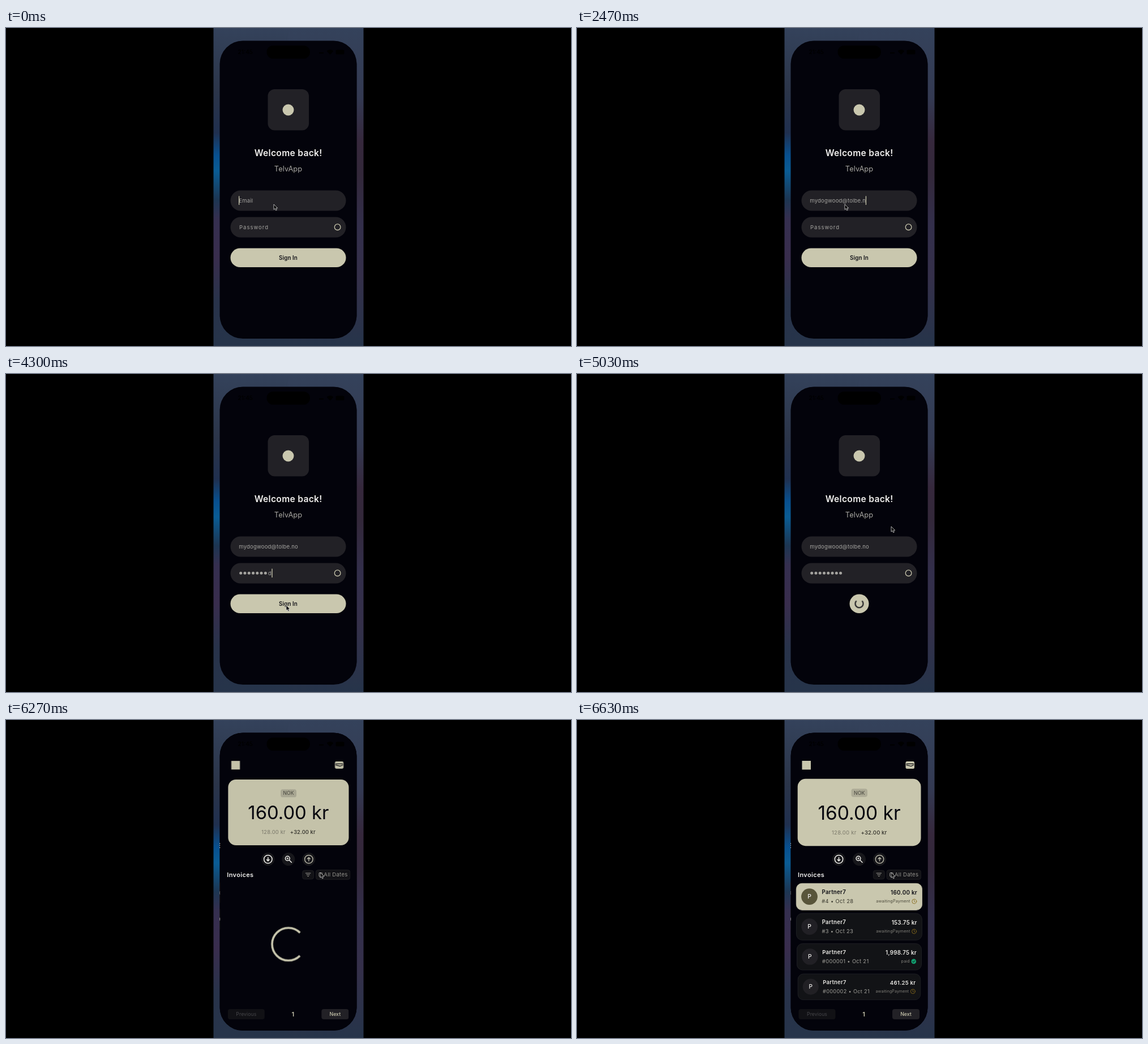
An HTML page that plays this animation: 998 px wide and 561 px high, repeating every 6.67 s.

```html
<!DOCTYPE html>
<html lang="en">
<head>
<meta charset="utf-8">
<title>Sign in</title>
<style>
  :root { --bg: #03030b; --tile: #222126; --sand: #c9c7ae; --loop: 6670ms; }
  html, body { margin: 0; width: 100%; height: 100%; overflow: hidden; background: #000; }
  svg { display: block; }
  text { font-family: Inter, Roboto, sans-serif; white-space: pre; }
  .mid { text-anchor: middle; }
  .end { text-anchor: end; }
  .semi { font-weight: 600; }
  .sand { fill: var(--sand); }
  .tile { fill: var(--tile); }
  .line { fill: none; stroke-linecap: round; stroke-linejoin: round; }
  .field { font-size: 9.5px; letter-spacing: .2px; fill: #a5a4a0; }

  #mouse { animation: mouse var(--loop) infinite; }
  @keyframes mouse {
    0%, 55.2% { transform: translate(473px, 311px); animation-timing-function: ease-in-out; }
    64.5%, 67% { transform: translate(495px, 408px); animation-timing-function: ease-in-out; }
    75%, 100% { transform: translate(555px, 269px); }
  }
  #button { animation: collapse var(--loop) infinite; }
  @keyframes collapse {
    0%, 65.5% { x: 396.5px; width: 204px; animation-timing-function: ease-in-out; }
    70%, 100% { x: 481.5px; width: 34px; }
  }
  #label { animation: label var(--loop) linear infinite; }
  @keyframes label { 0%, 65.5% { opacity: 1; } 67%, 100% { opacity: 0; } }
  #busy { animation: busy var(--loop) linear infinite; }
  @keyframes busy { 0%, 66.5% { opacity: 0; } 68.5%, 100% { opacity: 1; } }

  #login { animation: leave var(--loop) infinite; }
  @keyframes leave {
    0%, 90.48% { transform: none; animation-timing-function: cubic-bezier(.35, .91, .33, .97); }
    94.23%, 100% { transform: translateX(-80.7px); }
  }
  #home { animation: enter var(--loop) infinite; }
  @keyframes enter {
    0%, 90.48% { transform: translateX(242px); animation-timing-function: cubic-bezier(.283, .044, .545, .57); }
    91.22% { transform: translateX(111px); animation-timing-function: cubic-bezier(.209, 1, .434, .976); }
    94.23%, 100% { transform: none; }
  }
  .pop, .item { transform-box: fill-box; transform-origin: center; }
  .pop { animation: pop var(--loop) infinite; }
  @keyframes pop {
    0%, 91.424% { transform: scale(0); opacity: 0; animation-timing-function: cubic-bezier(.215, .61, .355, 1); }
    94.83%, 100% { transform: none; opacity: 1; }
  }
  .item { animation: item var(--loop) infinite backwards; }
  @keyframes item {
    0%, 96.85% { transform: scale(0); opacity: 0; animation-timing-function: cubic-bezier(.215, .61, .355, 1); }
    99.4%, 100% { transform: none; opacity: 1; }
  }
  #loading { animation: loading var(--loop) step-end infinite; }
  @keyframes loading { 0%, 96.85% { visibility: hidden; } 91.75% { visibility: visible; } 100% { visibility: hidden; } }

  .spin { animation: spin var(--loop) linear infinite; }
  @keyframes spin { to { transform: rotate(2160deg); } }
  .arc { fill: none; animation: arc 667ms cubic-bezier(.4, 0, .2, 1) infinite; }
  @keyframes arc {
    0% { stroke-dasharray: 1 360; stroke-dashoffset: 0; }
    50% { stroke-dasharray: 270 360; stroke-dashoffset: -45; }
    100% { stroke-dasharray: 1 360; stroke-dashoffset: -360; }
  }
</style>
</head>
<body>
<svg width="998" height="561" viewBox="0 0 998 561">
  <defs>
    <linearGradient id="left" x2="0" y2="1">
      <stop offset="0" stop-color="#34425b"/><stop offset=".2" stop-color="#2b3549"/>
      <stop offset=".33" stop-color="#20304f"/><stop offset=".4" stop-color="#08508f"/>
      <stop offset=".45" stop-color="#0a5c94"/><stop offset=".54" stop-color="#1d3652"/>
      <stop offset=".6" stop-color="#352f4f"/><stop offset=".72" stop-color="#392d4d"/>
      <stop offset=".86" stop-color="#28334a"/><stop offset="1" stop-color="#26344a"/>
    </linearGradient>
    <linearGradient id="right" x2="0" y2="1">
      <stop offset="0" stop-color="#34425b"/><stop offset=".22" stop-color="#343a52"/>
      <stop offset=".36" stop-color="#36283c"/><stop offset=".46" stop-color="#33283a"/>
      <stop offset=".62" stop-color="#332f4b"/><stop offset=".78" stop-color="#35304a"/>
      <stop offset="1" stop-color="#26344a"/>
    </linearGradient>
    <clipPath id="screen"><rect x="377.5" y="22.5" width="242" height="525.5" rx="41"/></clipPath>
  </defs>

  <rect width="998" height="561"/>
  <rect x="366.5" width="132.5" height="561" fill="url(#left)"/>
  <rect x="498.5" width="133" height="561" fill="url(#right)"/>

  <g clip-path="url(#screen)">
    <rect x="377" y="22" width="243" height="527" fill="var(--bg)"/>

    <g id="login">
      <rect class="tile" x="462.5" y="108" width="72.5" height="72.5" rx="12"/>
      <circle class="sand" cx="498.5" cy="144.5" r="10"/>
      <text class="mid semi" x="498.6" y="225.6" font-size="15.6" letter-spacing=".3" fill="#f1f0ee">Welcome back!</text>
      <text class="mid" x="498.5" y="252.5" font-size="12.8" letter-spacing=".1" fill="#a9a8a2">TelvApp</text>
      <rect class="tile" x="396.5" y="286.5" width="204" height="36" rx="18"/>
      <rect class="tile" x="396.5" y="333.5" width="204" height="36" rx="18"/>
      <text id="email" class="field" x="411.3" y="308"></text>
      <text id="hint" class="field" x="412" y="354.8" style="letter-spacing: 1px">Password</text>
      <g id="dots" fill="#a5a4a0"></g>
      <text id="last" class="field" y="354.8"></text>
      <rect id="caret" class="sand" width="1.3" height="15.5"/>
      <circle class="line" cx="585.6" cy="351.2" r="5.3" stroke="#c9c7ae" stroke-width="1.3"/>
      <rect id="button" class="sand" x="396.5" y="388.5" width="204" height="33.5" rx="16.8"/>
      <text id="label" class="mid semi" x="498.5" y="408.8" font-size="9.8" letter-spacing=".1" fill="#15151a">Sign In</text>
      <g id="busy"><g transform="translate(498.5 405.2) rotate(-278.9)"><g class="spin">
        <circle class="arc" r="7" pathLength="360" stroke="#17171b" stroke-width="2" style="animation-delay: 28ms"/>
      </g></g></g>
    </g>

    <g id="home">
      <rect x="377.5" y="22" width="243" height="527" fill="var(--bg)"/>
      <rect class="pop sand" x="397.5" y="72" width="15.5" height="15.5"/>
      <g class="pop">
        <rect class="sand" x="580.5" y="73" width="15.5" height="13" rx="2.5"/>
        <path class="line" d="M582 77.3h12.5M582 79.3l8 2.2 4.5-2.2" stroke="#03030b" stroke-width="1.2"/>
      </g>

      <g class="pop">
        <rect class="sand" x="389.7" y="103.8" width="217.8" height="118.4" rx="14"/>
        <rect x="484.5" y="121.3" width="28.5" height="14.4" rx="4" fill="#adab96"/>
        <text class="mid" x="498.7" y="131.8" font-size="8.8" fill="#44433b">NOK</text>
        <text class="mid" x="498.5" y="175.6" font-size="33.5" fill="#05050e">160.00 kr</text>
        <text x="450" y="201.5" font-size="9.6" letter-spacing=".2" fill="#7d7b6c">128.00 kr</text>
        <text class="end" x="547.4" y="201.5" font-size="9.6" letter-spacing=".1" fill="#302f29" font-weight="500">+32.00 kr</text>
      </g>

      <g fill="#17171b">
        <circle cx="462.5" cy="245.6" r="11.5"/><circle cx="498.5" cy="245.6" r="11.5"/><circle cx="534.5" cy="245.6" r="11.5"/>
      </g>
      <g class="line" stroke-width="1.5">
        <g stroke="#f3f2ee">
          <circle cx="462.5" cy="245.6" r="7.2"/>
          <path d="M462.5 242.4v6M460.2 246.3l2.3 2.3 2.3-2.3"/>
          <circle cx="497" cy="244.2" r="3.9"/>
          <path d="M500 247.2l4 4"/>
          <path d="M495.4 244.2h3.2M497 242.6v3.2" stroke-width="1"/>
        </g>
        <g stroke="#b3b1a3">
          <circle cx="534.5" cy="245.6" r="7.2"/>
          <path d="M534.5 248.8v-6M532.2 244.9l2.3-2.3 2.3 2.3"/>
        </g>
      </g>

      <text class="semi" x="390" y="276.7" font-size="11" letter-spacing=".35" fill="#f1f0ee">Invoices</text>
      <g fill="#121216" stroke="#222226" stroke-width=".8">
        <rect x="523.3" y="265.2" width="20" height="15.6" rx="4"/>
        <rect x="547" y="264.6" width="60.6" height="16.8" rx="4"/>
      </g>
      <path class="line" d="M529 270.2h8.6M530.6 272.9h5.4M532.3 275.6h2" stroke="#a09f98"/>
      <rect class="line" x="552.5" y="269.5" width="6" height="6.5" rx="1" stroke="#8f8e88"/>
      <text x="561" y="276.3" font-size="9.6" letter-spacing=".25" fill="#94938d">All Dates</text>

      <g id="loading"><g transform="translate(498.5 395.5) rotate(-230.5)"><g class="spin">
        <circle class="arc" r="28.8" pathLength="360" stroke="#c9c7ae" stroke-width="3.6" style="animation-delay: -66ms"/>
      </g></g></g>
      <g id="list"></g>

      <rect x="391.5" y="510" width="65" height="18" rx="4" fill="#111115"/>
      <text class="mid" x="424" y="522" font-size="8.6" letter-spacing=".1" fill="#47474b">Previous</text>
      <text class="mid semi" x="506.6" y="522.6" font-size="11" fill="#c9c7ae">1</text>
      <rect class="tile" x="557" y="510" width="48" height="18" rx="4"/>
      <text class="mid" x="581" y="522" font-size="8.8" font-weight="500" fill="#c9c7ae">Next</text>
    </g>

    <g>
      <rect x="460.5" y="31" width="76.5" height="23" rx="11.5"/>
      <text class="semi" x="409.5" y="46" font-size="10">21:45</text>
      <path d="M553 43h8v2h-8zM566.5 40.5q6-5 12 0l-6 6.5z"/>
      <rect x="582.5" y="38.5" width="15" height="8" rx="2.5"/>
    </g>
  </g>

  <g id="mouse">
    <path d="M0 0v9.3l2.1-1.9 1.5 3.3 1.7-.7-1.5-3.2h2.9z" fill="#000" stroke="#dcdcdc" stroke-width=".8" stroke-linejoin="round"/>
  </g>
</svg>

<script>
  const LOOP = 6670;
  const $ = id => document.getElementById(id);

  const invoices = [
    ['#4', 'Oct 28', '160.00'],
    ['#3', 'Oct 23', '153.75'],
    ['#000001', 'Oct 21', '1,998.75', true],
    ['#000002', 'Oct 21', '461.25'],
  ];

  const badge = paid => paid
    ? `<circle cx="595.8" cy="32" r="4.4" fill="#12a070"/>
       <path class="line" d="M593.8 32.1l1.4 1.4 2.6-2.8" stroke="#0b0b10"/>`
    : `<circle class="line" cx="595.8" cy="32" r="4" stroke="#8a6c1c" stroke-width=".9"/>
       <path class="line" d="M595.8 29.7v2.5l1.6 1" stroke="#8a6c1c" stroke-width=".9"/>`;

  const row = ([number, date, sum, paid], i) => {
    const [fill, edge, disc, ink, soft, faint] = i
      ? ['#131417', '#25262a', '#222126', '#efeeea', '#a3a29c', '#85847e']
      : ['#c9c7ae', '#c9c7ae', '#58553a', '#0b0b12', '#3a392f', '#4a483a'];
    return `<g transform="translate(0 ${288 + i * 53})"><g class="item" style="animation-delay: ${i * 15}ms">
      <rect x="387.3" y=".3" width="222.3" height="47" rx="10" fill="${fill}" stroke="${edge}" stroke-width=".8"/>
      <circle cx="410.5" cy="23.6" r="14.4" fill="${disc}"/>
      <text class="mid" x="410.5" y="27.3" font-size="10.4" font-weight="500" fill="#f1f0ee">P</text>
      <text class="semi" x="432.5" y="19" font-size="9.7" letter-spacing=".3" fill="${ink}">Partner7</text>
      <text x="432.3" y="35.4" font-size="9.4" letter-spacing=".35" fill="${soft}">${number} • ${date}</text>
      <text class="end semi" x="601" y="20.2" font-size="9.8" letter-spacing=".3" fill="${ink}">${sum} kr</text>
      <text class="end" x="588.6" y="34.4" font-size="7.2" letter-spacing=".15" fill="${faint}">${paid ? 'paid' : 'awaitingPayment'}</text>
      ${badge(paid)}
    </g></g>`;
  };
  $('list').innerHTML = invoices.map(row).join('');

  const address = 'mydogwood@tolbe.no', secret = 'password', pitch = 7.27;
  const addressAt = i => i < 9 ? 400 + i * 50 : i === 9 ? 1570 : i < 17 ? 1730 + (i - 10) * 95 : 2470;
  const secretAt = i => i < 7 ? 2770 + i * 66 : 3330;
  const typed = (text, at, t) => [...text].filter((_, i) => t >= at(i)).length;

  $('dots').innerHTML = [...secret].map((_, i) =>
    `<circle cx="${414.7 + i * pitch}" cy="351.3" r="2.5"/>`).join('');
  const dots = [...$('dots').children];
  const clock = $('mouse').getAnimations()[0];

  function draw() {
    const t = (clock.currentTime || 0) % LOOP;
    const a = typed(address, addressAt, t), s = typed(secret, secretAt, t);
    const submitted = t >= 4370, onSecret = t >= 2600;

    const email = $('email');
    email.textContent = a ? address.slice(0, a) : 'Email';
    $('hint').style.opacity = s ? 0 : 1;

    // The newest password letter stays readable until the form is sent.
    const hidden = submitted ? s : s - 1;
    dots.forEach((dot, i) => dot.style.opacity = i < hidden ? 1 : 0);
    $('last').textContent = s && !submitted ? secret[s - 1] : '';
    $('last').setAttribute('x', 412 + (s - 1) * pitch);

    const caret = $('caret');
    const x = onSecret ? 411.2 + s * pitch : 411 + (a ? email.getComputedTextLength() : 0);
    caret.setAttribute('x', x);
    caret.setAttribute('y', onSecret ? 343.5 : 296.5);
    const fade = Math.min(1, Math.max(0, (Math.abs(t - 1215) - 85) / 130));
    caret.style.opacity = submitted ? 0 : fade;

    requestAnimationFrame(draw);
  }
  requestAnimationFrame(draw);
</script>
</body>
</html>
```
